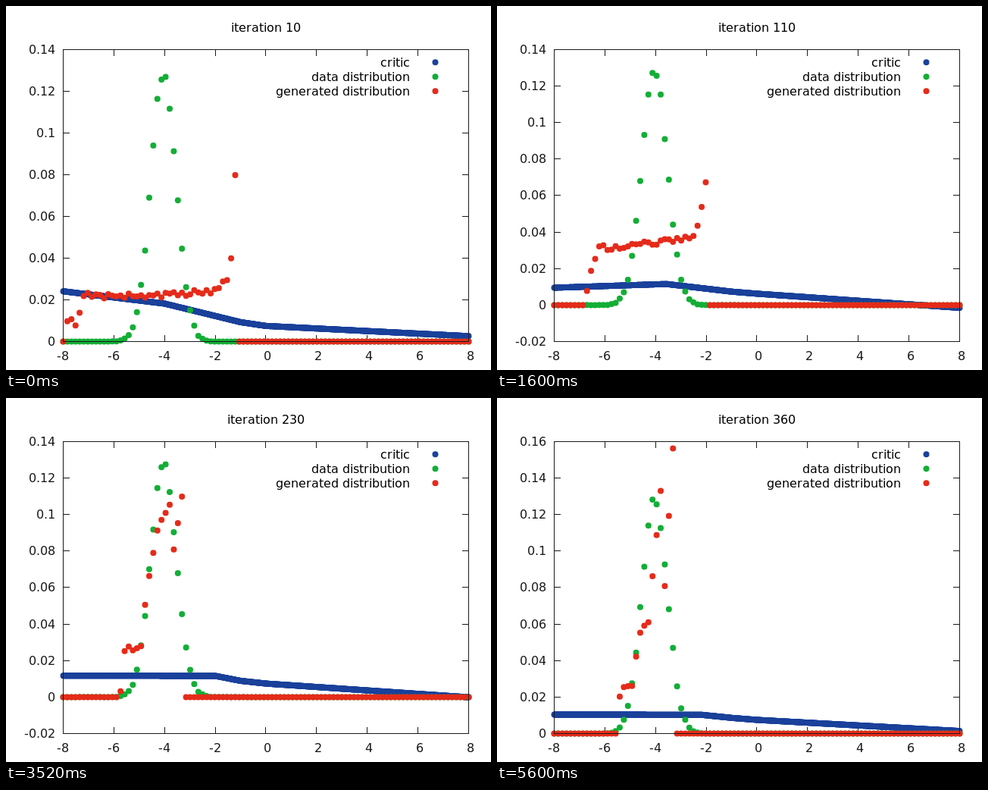
Animation, 640 px wide and 480 px high, one loop 5.76 s. Source, as an HTML page with a canvas:

```html
<!DOCTYPE html>
<html lang="en">
<head>
<meta charset="utf-8">
<title>Critic and distributions</title>
<style>
html, body { margin: 0; width: 100%; height: 100%; overflow: hidden; background: #fff; }
canvas { display: block; }
</style>
</head>
<body>
<canvas id="stage" width="640" height="480"></canvas>
<script>
const ctx = document.getElementById('stage').getContext('2d');
const STEP = 160, STEPS = 36, BINS = 100, CRITIC_DOTS = 1000;
const LEFT = 75.5, RIGHT = 610.5, TOP = 57.5, BOTTOM = 442.5;
const BLUE = '#1b429b', GREEN = '#13ae36', RED = '#e52b1a', INK = '#1a1a1a';

// Key poses, heights in 1/10000.
// kink: x of the critic's bend; critic: its values at -8, kink, -1, 0, 8
// gen: outline of the generated samples as [bin, height] corners
const poses = [
  { it: 10, kink: -4, critic: [241, 182, 93, 75, 26],
    gen: [[1, 103], [3, 84], [5, 218], [24, 226], [37, 245], [40, 306], [41, 412], [42, 797]] },
  { it: 80, kink: -4, critic: [101, 118, 74, 64, -3],
    gen: [[5, 47], [6, 226], [8, 260], [25, 268], [36, 288], [38, 359], [39, 517], [40, 592]] },
  { it: 150, kink: -3, critic: [87, 112, 73, 60, -31],
    gen: [[12, 143], [14, 205], [15, 380], [22, 435], [28, 480], [30, 410], [32, 550], [34, 908]] },
  { it: 230, kink: -2, critic: [117, 116, 89, 74, -1],
    gen: [[14, 35], [15, 265], [19, 275], [20, 513], [23, 924], [26, 1050], [27, 816], [29, 1086]] },
  { it: 320, kink: -1.7, critic: [103, 103, 92, 76, 11],
    gen: [[15, 201], [16, 275], [19, 270], [20, 554], [23, 860], [26, 1187], [27, 765], [29, 1223]] },
  { it: 360, kink: -2.2, critic: [104, 103, 86, 75, 14],
    gen: [[16, 193], [17, 270], [19, 260], [21, 560], [23, 625], [26, 1340], [27, 820], [29, 1564]] }
];

const mix = (a, b, t) => a + (b - a) * t;
const snap = v => Math.ceil(v) - 0.5;

function random(seed) {
  let s = seed >>> 0;
  return () => {
    s = (s + 0x6D2B79F5) >>> 0;
    let r = Math.imul(s ^ (s >>> 15), 1 | s);
    r = (r + Math.imul(r ^ (r >>> 7), 61 | r)) ^ r;
    return ((r ^ (r >>> 14)) >>> 0) / 4294967296;
  };
}

// Normal distribution around -4 with deviation 0.5, per bin of 0.16
function bell(i) {
  const d = (i - 24.5) * 0.16;
  return 0.1277 * Math.exp(-2 * d * d);
}

// Height at x of a polyline of [x, y] points
function along(points, x) {
  let k = 0;
  while (k < points.length - 2 && x > points[k + 1][0]) k++;
  const [x1, y1] = points[k], [x2, y2] = points[k + 1];
  const t = (x - x1) / (x2 - x1);
  return mix(y1, y2, Math.max(0, Math.min(1, t)));
}

function build(it) {
  let n = 0;
  while (n < poses.length - 2 && it >= poses[n + 1].it) n++;
  const a = poses[n], b = poses[n + 1];
  const t = (it - a.it) / (b.it - a.it);
  const rnd = random(it * 97);
  const noise = size => (rnd() * 2 - 1) * size;

  const knots = [-8, mix(a.kink, b.kink, t), -1, 0, 8];
  const critic = knots.map((x, i) => [x, mix(a.critic[i], b.critic[i], t) / 1e4]);
  const outline = a.gen.map(([bin, h], i) =>
    [mix(bin, b.gen[i][0], t), mix(h, b.gen[i][1], t) / 1e4]);
  const lo = Math.round(outline[0][0]);
  const hi = Math.round(outline[outline.length - 1][0]);

  const data = [], gen = [];
  for (let i = 0; i < BINS; i++) {
    const p = bell(i);
    data.push(Math.max(0, p + noise(0.008) * Math.sqrt(p)));
    gen.push(i < lo || i > hi ? 0 : along(outline, i) + noise(0.0016));
  }
  const max = Math.ceil(Math.max(...data, ...gen) / 0.02) * 0.02;
  const min = critic[4][1] < 0 ? -0.02 : 0;
  return { it, critic, data, gen, min, max };
}

function dot(x, y, color) {
  ctx.fillStyle = color;
  ctx.beginPath();
  ctx.arc(x, y, 4, 0, 7);
  ctx.fill();
}

function line(x1, y1, x2, y2) {
  ctx.beginPath();
  ctx.moveTo(x1, y1);
  ctx.lineTo(x2, y2);
  ctx.stroke();
}

// Letters advance by whole pixels; align is 0.5 for centred, 1 for right
function text(str, x, y, align, color = '#000') {
  const steps = [...str].map(c => Math.round(ctx.measureText(c).width));
  const width = steps.reduce((sum, w) => sum + w, 0);
  let pen = Math.floor(x - width * align);
  ctx.fillStyle = color;
  [...str].forEach((c, i) => {
    ctx.fillText(c, pen, y);
    pen += steps[i];
  });
}

function draw(s) {
  const toY = v => mix(BOTTOM, TOP, (v - s.min) / (s.max - s.min));
  const toX = u => mix(LEFT, RIGHT, u);
  ctx.fillStyle = '#fff';
  ctx.fillRect(0, 0, 640, 480);
  ctx.font = '16px "DejaVu Sans", sans-serif';
  ctx.strokeStyle = INK;
  ctx.lineWidth = 1;

  const rows = Math.round((s.max - s.min) / 0.02);
  for (let r = 0; r <= rows; r++) {
    const y = snap(mix(BOTTOM, TOP, r / rows));
    line(LEFT, y, LEFT + 8.5, y);
    line(RIGHT - 8.5, y, RIGHT, y);
    text(String(Math.round(s.min * 100 + r * 2) / 100), 65, y + 5.5, 1, INK);
  }
  for (let v = -8; v <= 8; v += 2) {
    const x = snap(toX((v + 8) / 16));
    line(x, BOTTOM, x, BOTTOM - 8.5);
    line(x, TOP, x, TOP + 8.5);
    text(v < 0 ? String(v) : ' ' + v, x, 467, 0.5, INK);
  }
  text('iteration ' + s.it, 343, 34, 0.5);

  const legend = (name, row, color) => {
    text(name, 533, 80 + row * 19, 1);
    dot(566.5, 74.3 + row * 19, color);
  };
  const bars = (values, color) =>
    values.forEach((v, i) => dot(toX(i / (BINS - 1)), toY(v), color));

  legend('critic', 0, BLUE);
  for (let i = 0; i < CRITIC_DOTS; i++) {
    const u = i / (CRITIC_DOTS - 1);
    dot(toX(u), toY(along(s.critic, u * 16 - 8)), BLUE);
  }
  legend('data distribution', 1, GREEN);
  bars(s.data, GREEN);
  legend('generated distribution', 2, RED);
  bars(s.gen, RED);

  ctx.strokeRect(LEFT, TOP, RIGHT - LEFT, BOTTOM - TOP);
}

let shown = -1;
function tick() {
  const step = Math.floor(performance.now() / STEP) % STEPS;
  if (step !== shown) {
    shown = step;
    draw(build((step + 1) * 10));
  }
  requestAnimationFrame(tick);
}
tick();
</script>
</body>
</html>
```
